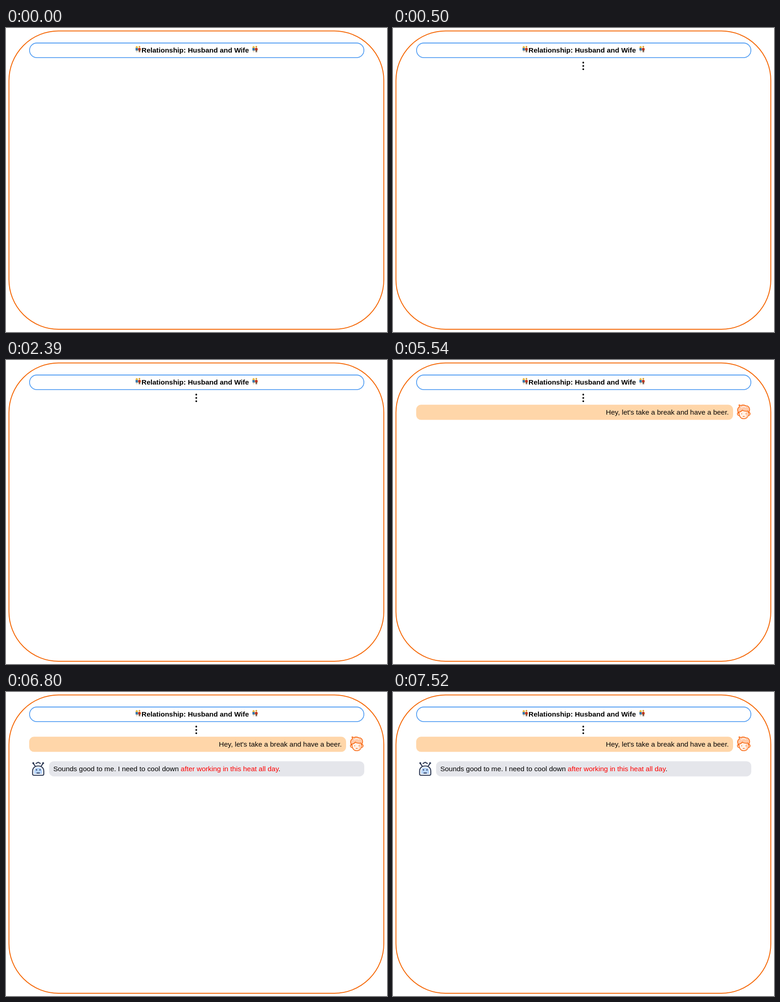
Animation of 838x668 px, one loop 8000 ms. Source, as an HTML page:

```html
<!DOCTYPE html>
<html lang="en">
<head>
<meta charset="utf-8">
<title>Chat</title>
<style>
  html, body { margin: 0; width: 100%; height: 100%; overflow: hidden; background: #fff; }
  svg { display: block; font: 15.43px "Liberation Sans", Arial, sans-serif; }
  [data-from] { visibility: hidden; }
</style>
</head>
<body>
<svg width="838" height="668" viewBox="0 0 838 668">
  <defs>
    <g id="couple">
      <path d="M1.3 7V3.2a2.2 2.4 0 0 1 4.6 0V7z" fill="#d9a62b"/>
      <circle cx="3.6" cy="3.2" r="1.5" fill="#f7c94b"/>
      <path d="M.7 6 2 5h3.3l1.2 1-.5 5H1.5z" fill="#3476ad"/>
      <path d="M1.8 10.5h3.7l-.2 4H4.1l-.5-2.5-.4 2.5H2z" fill="#e9d6bd"/>
      <circle cx="9.5" cy="2.5" r="1.9" fill="#f3bd42"/>
      <path d="M7.8 2.2a1.8 1.8 0 0 1 3.5 0z" fill="#b9822b"/>
      <path d="M6.5 6 8 4.7h3L12.4 6l-.7 4.2H7.4z" fill="#bd2c25"/>
      <path d="M6.5 6v4M12.4 6v4" stroke="#e5ae4a"/>
      <path d="M7.7 9.7h3.8l-.3 4.8H10l-.5-3-.4 3H8z" fill="#70533f"/>
    </g>
  </defs>

  <rect x="6.5" y="6.5" width="824.5" height="655.5" rx="109" fill="none" stroke="#f56a0a" stroke-width="2"/>
  <rect x="51.8" y="33" width="735.4" height="32.2" rx="16.1" fill="none" stroke="#559ff3" stroke-width="1.8"/>
  <use href="#couple" x="284" y="39"/>
  <text x="298" y="54" font-weight="bold">Relationship: Husband and Wife</text>
  <use href="#couple" x="541" y="39"/>

  <g data-from="500">
    <circle cx="418.5" cy="76" r="1.9"/>
    <circle cx="418.5" cy="83.3" r="1.9"/>
    <circle cx="418.5" cy="90.6" r="1.9"/>
  </g>

  <g data-from="3650">
    <rect x="51" y="98.3" width="697" height="33.2" rx="10.5" fill="#ffd6a9"/>
    <text x="738.5" y="120" text-anchor="end">Hey, let's take a break and have a beer.</text>
    <g fill="none" stroke="#f86a14" stroke-width="1.7" stroke-linecap="round" stroke-linejoin="round">
      <path d="M761 115c0 9 4 14 10.500 14s11-5 11-14l-1-5h-19z" fill="#fff0e6"/>
      <path d="M776 112h6c1 9-2 15-9 16.500 4-4 5-9 3-16.500z" fill="#ffd3b8" stroke="none"/>
      <path d="M760 117c-3-6-3-11 2-14l-1-4.500 4.500 1.500c5-3 9 0 11 .500 6 0 9 6 7.500 11l-1.500 5-2-4.500c-5 1-10 0-12-2-2 3-5 4-7.500 4z" fill="#ffc9a8"/>
      <path d="M766 105c3-3 7-3 10-1" stroke="#fff0e6"/>
      <path d="M760 116c-4-1-3 6 1.500 6M783 116c4-1 3 6-1.500 6"/>
      <path d="M767 117.800v1M776.500 117.800v1M770 124h3" stroke-width="1.4"/>
    </g>
  </g>

  <g data-from="6800">
    <rect x="94.700" y="152.200" width="693.300" height="33.200" rx="10.500" fill="#e5e6eb"/>
    <text x="104" y="174">Sounds good to me. I need to cool down <tspan fill="#f00">after working in this heat all day</tspan>.</text>
    <g fill="none" stroke="#2c3854" stroke-width="2.200" stroke-linecap="round" stroke-linejoin="round">
      <path d="M58.500 180v-6c0-7 5-11.500 12.300-11.500s12.300 4.500 12.300 11.500v6c0 2-1 3-3 3H61.500c-2 0-3-1-3-3z" fill="#fff"/>
      <path d="M61.800 180v-6c0-5 3.700-8.300 9-8.300s9 3.300 9 8.300v6z" fill="#b9d5fb" stroke="none"/>
      <path d="M64 162.500l-3.500-5M77.600 162.500l3.500-5M66 157l2.500-1.300 2.300-1.300 2.300 1.300 2.500 1.300"/>
      <g fill="#2c3854" stroke="none">
        <circle cx="60" cy="156.300" r="2.100"/>
        <circle cx="81.600" cy="156.300" r="2.100"/>
        <circle cx="67" cy="171" r="1.500"/>
        <circle cx="74.800" cy="171" r="1.500"/>
      </g>
      <path d="M68 178h5.700" stroke-width="1.900"/>
    </g>
  </g>
</svg>
<script>
  const LOOP = 8000;
  const steps = document.querySelectorAll('[data-from]');

  function draw() {
    const time = performance.now() % LOOP;
    for (const step of steps) {
      step.style.visibility = time >= step.dataset.from ? 'visible' : 'hidden';
    }
    requestAnimationFrame(draw);
  }
  draw();
</script>
</body>
</html>
```
